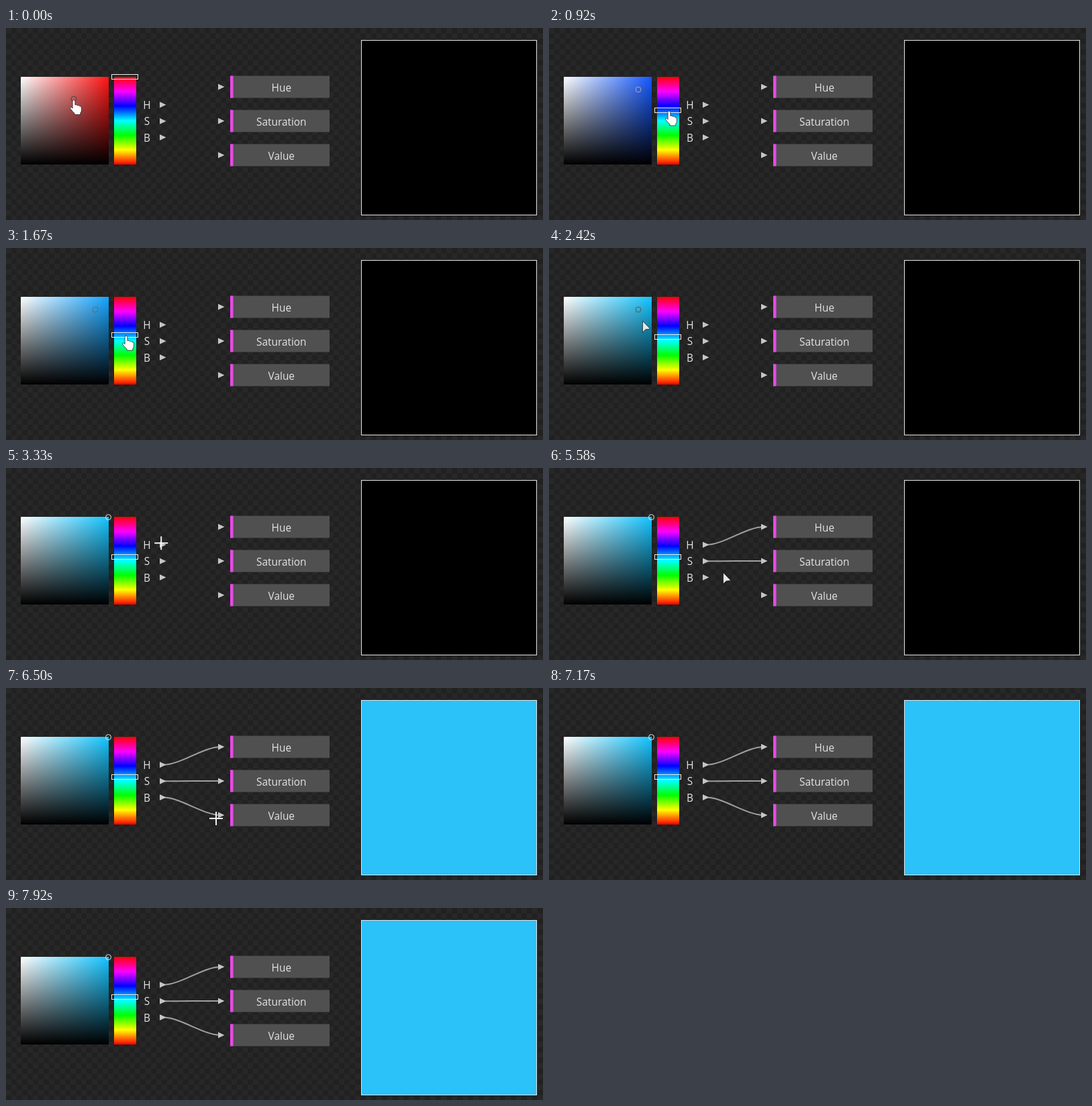
These frames come from a looping animation (800x287 px, 8000 ms). An HTML page:

```html
<!DOCTYPE html>
<html lang="en">
<head>
<meta charset="utf-8">
<title>Colour picker nodes</title>
<style>
  html, body { margin: 0; width: 100%; height: 100%; overflow: hidden; background: #222; }
  svg { display: block; width: 800px; height: 287px; }
  text { font-family: "Open Sans", "Noto Sans", sans-serif; font-size: 15.4px; fill: #e4e4e4; text-anchor: middle; }
  .node { fill: #505050; }
  .strip { fill: #e849e6; }
  .pin { fill: #c6c6c6; }
  .wire { fill: none; stroke: #a0a0a0; stroke-width: 2; }
  .outline { fill: none; stroke: #eee; }
  .pointer { fill: #fff; stroke: #111; stroke-width: .7; }
</style>
</head>
<body>
<svg viewBox="0 0 800 287">
  <defs>
    <pattern id="checker" width="16" height="16" patternUnits="userSpaceOnUse">
      <rect width="16" height="16" fill="#212121"/>
      <path d="M0 0H8V16H16V8H0Z" fill="#272727"/>
    </pattern>
    <linearGradient id="sat">
      <stop stop-color="#fff"/><stop offset="1" stop-color="#fff" stop-opacity="0"/>
    </linearGradient>
    <linearGradient id="val" x2="0" y2="1">
      <stop stop-opacity="0"/><stop offset="1"/>
    </linearGradient>
    <linearGradient id="hues" x2="0" y2="1"></linearGradient>
    <rect id="area" x="22" y="73" width="131" height="131"/>
  </defs>

  <rect width="800" height="287" fill="url(#checker)"/>
  <use id="tint" href="#area"/>
  <use href="#area" fill="url(#sat)"/>
  <use href="#area" fill="url(#val)"/>
  <rect x="161" y="73" width="33" height="131" fill="url(#hues)"/>
  <rect id="marker" class="outline" x="157.5" y="-3.5" width="39" height="7"/>
  <circle id="ring" r="4" fill="none"/>
  <g id="nodes"></g>
  <g id="wires"></g>
  <g id="pins" class="pin"></g>
  <rect id="preview" x="529.5" y="18.5" width="261" height="261" stroke="#e4e4e4"/>
  <g id="cursor">
    <path id="hand" class="pointer" d="M-1.9 1.6Q0-1.5 1.9 1.6V7.4Q4 6.4 5.2 8.2Q7.6 7.4 8.6 9.3Q11.4 9 11.4 12V15.5Q11.4 18 9.8 19.4V22H1V20Q-2 17.5-5.4 12.6Q-5.5 10.4-3.6 10.8L-1.9 12.6Z"/>
    <path id="arrow" class="pointer" style="fill:#e6e6e6" d="M0 0V17L4.4 12.8 11.4 12Z"/>
    <path id="cross" d="M-10 0H10M0-10V10" stroke="#f4f4f4" stroke-width="2"/>
  </g>
</svg>
<script>
const LOOP = 8000, FRAME = 1000 / 12;
const TOP = 73, SIZE = 131, OUT_X = 234, IN_X = 320;
const $ = id => document.getElementById(id);
const clamp = (v, low, high) => Math.max(low, Math.min(high, v));

function add(parent, tag, attrs, text = "") {
  const el = document.createElementNS("http://www.w3.org/2000/svg", tag);
  for (const key in attrs) el.setAttribute(key, attrs[key]);
  el.textContent = text;
  return parent.appendChild(el);
}

for (let i = 0; i <= 6; i++)
  add($("hues"), "stop", { offset: i / 6, "stop-color": `hsl(${360 - i * 60},100%,50%)` });

const links = [["H", "Hue"], ["S", "Saturation"], ["B", "Value"]].map(([from, to], i) => {
  const y1 = 114.8 + 24.4 * i, y2 = 88 + 51 * i;
  const box = { x: 334, y: y2 - 16.5, height: 33 };
  add($("nodes"), "text", { x: 210, y: y1 + 6.2 }, from);
  add($("nodes"), "rect", { class: "node", ...box, width: 148 });
  add($("nodes"), "rect", { class: "strip", ...box, width: 4.5 });
  add($("nodes"), "text", { x: 410.3, y: y2 + 6.5 }, to);
  for (const [x, y] of [[229, y1], [316, y2]])
    add($("pins"), "path", { d: `M${x} ${y - 4.5}L${x + 9.5} ${y}L${x} ${y + 4.5}Z` });
  const grab = 3400 + 1200 * i;
  return { to, y1, y2, grab, drop: grab + 600, wire: add($("wires"), "path", { class: "wire" }) };
});

// The pointer's stops; "drag" names what it holds on the way to the next stop
const stops = [];
const go = (t, x, y, drag) => stops.push({ t, x, y, drag });
go(0, 101, 107.5, "ring");
go(415, 133, 93.5);
go(590, 179, 75, "hue");
go(917, 179, 124, "hue");
go(2080, 179, 134);
go(2417, 139.5, 109);
go(2580, 133, 93.5, "ring");
go(2830, 160, 48);
for (const { to, y1, y2, grab, drop } of links) {
  go(grab, OUT_X, y1, to);
  go(drop, IN_X, y2);
}
go(6500, 313, 195);
go(7400, 350, 310);

function pointerAt(t) {
  const i = stops.findLastIndex(s => s.t <= t);
  const a = stops[i], b = stops[i + 1] || a;
  const p = (t - a.t) / (b.t - a.t || 1);
  const ease = p * p * (3 - 2 * p);
  return { x: a.x + (b.x - a.x) * ease, y: a.y + (b.y - a.y) * ease, drag: a.drag };
}

// Where the named part was last pulled to
function pulledTo(part, t) {
  const i = stops.findLastIndex(s => s.drag === part && s.t <= t);
  return i < 0 ? null : pointerAt(Math.min(t, stops[i + 1].t));
}

function shapeOf(p, ring) {
  const near = (x, y) => Math.hypot(p.x - x, p.y - y) < 12;
  const onPin = links.some(l => near(OUT_X, l.y1) || near(IN_X, l.y2));
  if (onPin || links.some(l => l.to === p.drag)) return "cross";
  const onBar = p.x > 157 && p.x < 197 && p.y > TOP && p.y < TOP + SIZE;
  return p.drag || onBar || near(ring.x, ring.y) ? "hand" : "arrow";
}

function move(id, x, y) {
  $(id).setAttribute("transform", `translate(${x} ${y})`);
}

function draw(t) {
  const pointer = pointerAt(t);
  const pull = pulledTo("ring", t);
  const ring = { x: clamp(pull.x, 22, 152.5), y: clamp(pull.y - 1.5, TOP + .5, TOP + SIZE) };
  const bar = pulledTo("hue", t);
  const markY = bar ? clamp(Math.round(bar.y - 1), TOP, TOP + SIZE) : TOP;
  const hue = 360 * (1 - (markY - TOP) / SIZE);

  // The ring is light on dark blue and outside the square, dark elsewhere
  const blueness = Math.max(0, Math.cos((hue - 240) * Math.PI / 180)) ** 6;
  const tone = ring.x > 150 ? 235 : 70 + 130 * blueness;

  move("cursor", pointer.x, pointer.y);
  move("ring", ring.x, ring.y);
  move("marker", 0, markY);
  $("ring").setAttribute("stroke", `rgb(${tone},${tone},${tone})`);
  $("tint").setAttribute("fill", `hsl(${hue},100%,54%)`);
  $("preview").setAttribute("fill", links.every(l => t >= l.drop) ? "#2bc1f9" : "#000");

  const shape = shapeOf(pointer, ring);
  for (const id of ["hand", "arrow", "cross"])
    $(id).style.display = id === shape ? "" : "none";

  for (const { to, y1, wire } of links) {
    const end = pulledTo(to, t);
    wire.style.display = end ? "" : "none";
    if (!end) continue;
    const bend = (end.x - OUT_X) * .31;
    wire.setAttribute("d", `M${OUT_X} ${y1}C${OUT_X + bend} ${y1} ${end.x - bend} ${end.y} ${end.x} ${end.y}`);
  }
}

const start = performance.now();
function tick() {
  const t = (performance.now() - start) % LOOP;
  draw(Math.min(95, Math.floor((t + 4) / FRAME)) * FRAME);
  requestAnimationFrame(tick);
}
tick();
</script>
</body>
</html>
```
